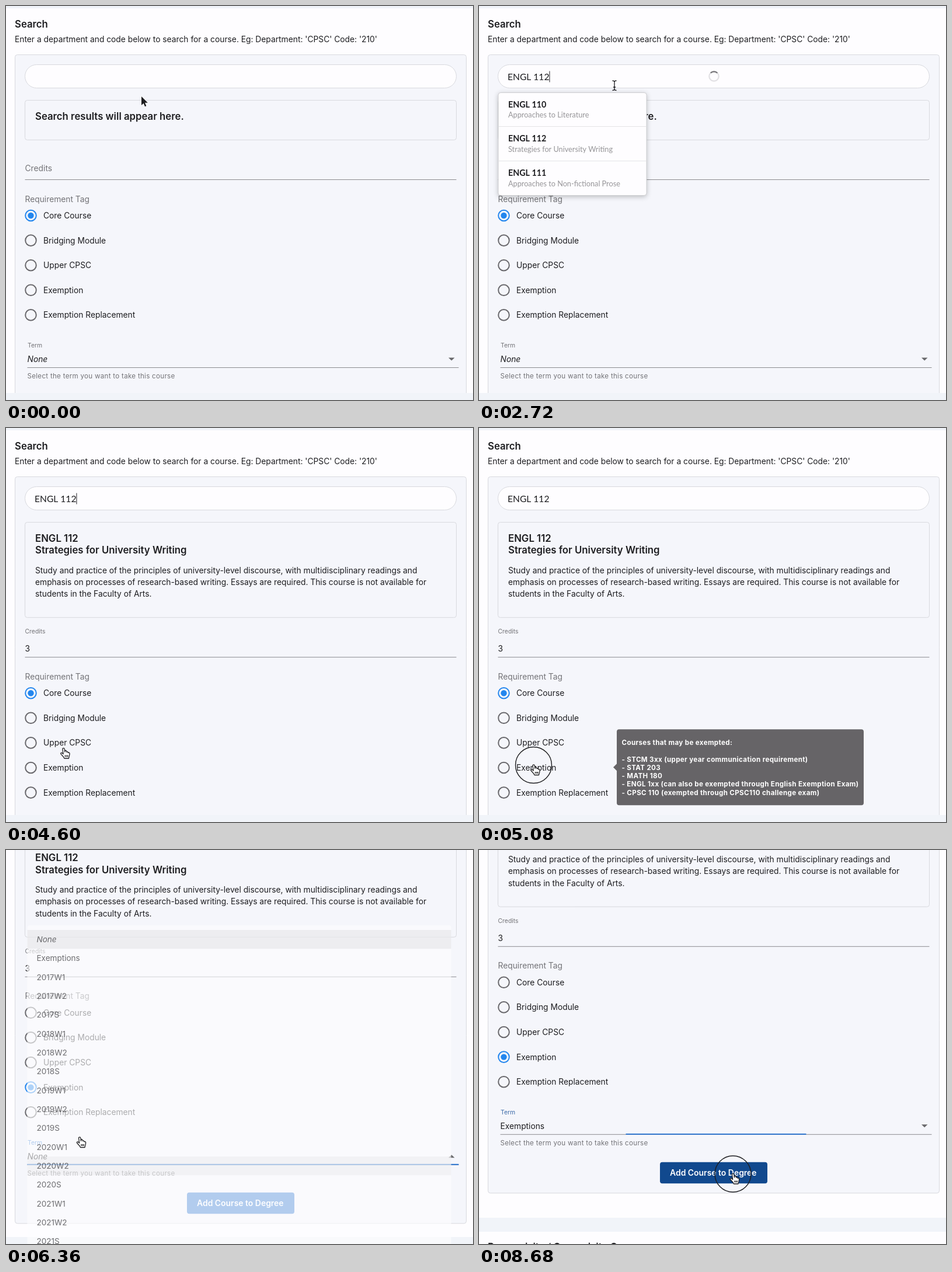
An HTML page with a canvas that plays this animation: 800x675 px, repeating every 8.72 s.

```html
<!DOCTYPE html>
<html lang="en">
<head>
<meta charset="utf-8">
<title>Course search</title>
<style>
  html, body { margin: 0; width: 100%; height: 100%; overflow: hidden; background: #f2f4f9; }
  canvas { display: block; }
</style>
</head>
<body>
<canvas id="stage" width="800" height="675"></canvas>
<script>
const ctx = document.getElementById('stage').getContext('2d');
const LOOP = 8720;
const INK = '#1d1d20', GREY = '#737377', LINE = '#d8d9de', PAPER = '#fefdff', PANEL = '#f5f6fb', BAND = '#f1f4f9', BLUE = '#2f77d2';

const T = { select: 3280, pick: 5180, open: 6208, close: 7521, blur: 8604 };
const KEYS = [[720, 'E'], [800, 'N'], [880, 'G'], [960, 'L'], [1040, ' '], [1320, '1'], [1520, '1'], [2360, '2']];
const LOADING = [[960, 1080], [1520, 2120], [2360, 3240]];
const CLICKS = [[400, 560], [3160, 3320], [5000, 5160], [6080, 6200], [7400, 7520], [8600, 8720]];
const PATH = [[0, 232, 155], [40, 232, 155], [360, 232, 136], [2740, 232, 136], [3120, 118, 238], [3340, 118, 238],
  [3840, 118, 452], [4040, 116, 458], [4240, 110.5, 479], [4800, 93.5, 577.5], [5240, 93.5, 577.5], [5400, 100, 560], [5800, 120, 524],
  [6200, 124, 526], [6360, 126, 492.5], [7000, 300, 176], [7500, 320, 174], [7760, 504, 484], [8160, 436, 600], [8560, 435, 555], [LOOP, 435, 555]];
const CURSORS = [[0, 'arrow'], [280, 'beam'], [2860, 'hand'], [3330, 'arrow'], [3700, 'hand']];

const RESULTS = [['ENGL 110', 'Approaches to Literature'], ['ENGL 112', 'Strategies for University Writing'],
  ['ENGL 111', 'Approaches to Non-fictional Prose']];
const ABOUT = ['Study and practice of the principles of university-level discourse, with multidisciplinary readings and',
  'emphasis on processes of research-based writing. Essays are required. This course is not available for',
  'students in the Faculty of Arts.'];
const TAGS = ['Core Course', 'Bridging Module', 'Upper CPSC', 'Exemption', 'Exemption Replacement'];
const CORE_TIP = ['Core BCS Courses that must be taken:',
  '- CPSC 110:   Computation, Programs, and Programming', '- CPSC 121:   Models of Computation',
  '- CPSC 210:   Software Construction', '- CPSC 221:   Basic Data Structures and Algorithms',
  '- CPSC 213:   Introduction to Computer Systems', '- CPSC 310:   Introduction to Software Engineering',
  '- CPSC 313:   Computer Hardware and Operating Systems', '- CPSC 320:   Intermediate Algorithm Design and Analysis'];
const EXEMPT_TIP = ['Courses that may be exempted:', '', '- STCM 3xx (upper year communication requirement)', '- STAT 203',
  '- MATH 180', '- ENGL 1xx (can also be exempted through English Exemption Exam)', '- CPSC 110 (exempted through CPSC110 challenge exam)'];
const TERMS = ['None', 'Exemptions'];
for (let year = 2017; year < 2022; year++) TERMS.push(year + 'W1', year + 'W2', year + 'S');

const lerp = (a, b, p) => a + (b - a) * p;
const within = (t, spans) => spans.some(([a, b]) => t >= a && t < b);

// cubic-bezier(.4, 0, .2, 1)
function ease(x) {
  if (x <= 0) return 0;
  if (x >= 1) return 1;
  let lo = 0, hi = 1;
  for (let i = 0; i < 20; i++) {
    const s = (lo + hi) / 2, r = 1 - s;
    if (1.2 * r * r * s + 0.6 * r * s * s + s * s * s < x) lo = s; else hi = s;
  }
  return lo * lo * (3 - 2 * lo);
}
const ramp = (t, start, length) => ease((t - start) / length);

// Popover transition: scale leads when opening and lags when closing
function grow(t, open, close, length) {
  const inT = (t - open) / length, outT = (t - close) / length;
  const size = outT > 0 ? 1 - ease((outT - 0.333) / 0.667) : ease(inT / 0.6);
  return { alpha: outT > 0 ? 1 - ease(outT) : ease(inT), scale: 0.75 + 0.25 * size };
}

// y is the middle of the capitals
function text(str, x, y, { size = 13.8, color = INK, weight = 400, family = 'Inter', style = 'normal', spacing = 0 } = {}) {
  ctx.font = `${style} ${weight} ${size}px ${family}, sans-serif`;
  ctx.letterSpacing = spacing + 'px';
  ctx.fillStyle = color;
  ctx.fillText(str, x, y + size * 0.363);
}
const heading = (str, x, y) => text(str, x, y, { size: 16.75, weight: 600 });

function rect(x, y, w, h, fill) {
  ctx.fillStyle = fill;
  ctx.fillRect(x, y, w, h);
}
function box(x, y, w, h, r, fill, stroke) {
  ctx.beginPath();
  ctx.roundRect(x, y, w, h, r);
  if (fill) { ctx.fillStyle = fill; ctx.fill(); }
  if (stroke) { ctx.strokeStyle = stroke; ctx.lineWidth = 1; ctx.stroke(); }
}
function arc(x, y, r, color, width, from = 0, to = 7) {
  ctx.beginPath();
  ctx.arc(x, y, r, from, to);
  ctx.strokeStyle = color;
  ctx.lineWidth = width;
  ctx.stroke();
}
function poly(points, fill) {
  ctx.beginPath();
  points.forEach(([x, y]) => ctx.lineTo(x, y));
  ctx.closePath();
  ctx.fillStyle = fill;
  ctx.fill();
}

function drawInput(t) {
  box(32.5, 100.5, 739, 40, 20, PAPER, LINE);
  const typed = KEYS.filter(([at]) => t >= at).map(key => key[1]).join('');
  text(typed, 49, 121, { size: 15.6, family: 'Lato' });
  if (t > 560 && t < 5000) rect(49 + ctx.measureText(typed).width, 111.5, 1, 19, INK);
  if (within(t, LOADING)) {
    const a = (t - 2720) / 600 * 2 * Math.PI - Math.PI * 0.75;
    arc(402.5, 120.5, 8.2, '#e2e1e4', 2.2);
    arc(402.5, 120.5, 8.2, '#767578', 2.2, a, a + Math.PI / 2);
  }
}

function drawRadio(label, y, checked) {
  arc(42.5, y, 9.3, checked ? '#2386ee' : '#69686c', 2);
  if (checked) {
    ctx.beginPath();
    ctx.arc(42.5, y, 5.2, 0, 7);
    ctx.fillStyle = '#2386ee';
    ctx.fill();
  }
  text(label, 64, y);
}

function drawTerm(t) {
  const open = t > T.open && t < T.close;
  const line = ramp(t, 6100, 200) * (1 - ramp(t, T.blur, 200));
  if (t > T.close && t < T.blur) rect(36.5, 591, 739, 28, 'rgba(0,0,0,.06)');
  const tint = t < T.blur ? BLUE : '#3c6ba8';
  text('Term', 37, 581.5, { size: 10.4, color: t > 6100 ? tint : GREY });
  if (t < T.close) text('None', 36.5, 605, { style: 'italic' });
  else text('Exemptions', 36.5, 605);
  rect(36.5, 619, 739, 1, '#8b8b8f');
  rect(406 - 369.5 * line, 618, 739 * line, 2, BLUE);
  const d = open ? -2.5 : 2.5;
  poly([[758, 605 - d], [768.5, 605 - d], [763.2, 605 + d]], '#68686b');
  text('Select the term you want to take this course', 36.5, 633.5, { size: 11.6, color: GREY, spacing: 0.28 });
}

function drawForm(t) {
  const chosen = t >= T.select, extra = chosen ? 95.2 : 0;
  heading('Search', 15, 30.5);
  text("Enter a department and code below to search for a course. Eg: Department: 'CPSC' Code: '210'", 15, 57);
  box(15.5, 83.5, 773, 636.5 + extra, 4, PANEL, LINE);
  drawInput(t);
  box(32.5, 161.5, 739, 68 + extra, 4, null, LINE);
  if (chosen) {
    heading('ENGL 112', 50, 188.5);
    heading('Strategies for University Writing', 50, 209);
    ABOUT.forEach((line, i) => text(line, 50, 243.5 + 20.3 * i));
  } else heading('Search results will appear here.', 50, 188.5);

  ctx.save();
  ctx.translate(0, extra);
  const shrink = ramp(t, T.select, 200);
  text('Credits', 32.5, lerp(278, 253.5, shrink), { size: lerp(13.8, 10.4, shrink), color: GREY });
  if (chosen) text('3', 32.5, 283);
  rect(32.5, 297, 739, 1, '#8b8b8f');
  text('Requirement Tag', 32.5, 330.5, { color: GREY });
  TAGS.forEach((tag, i) => drawRadio(tag, 359 + 42.6 * i, i === (t < T.pick ? 0 : 3)));
  drawTerm(t);
  box(310, 667, 184, 36.5, 4, t < 8180 ? BLUE : '#11498e');
  text('Add Course to Degree', 327, 685.3, { size: 13.95, color: '#fff', weight: 600 });
  ctx.restore();
}

function drawResults() {
  ctx.save();
  ctx.shadowColor = 'rgba(34,36,38,.3)';
  ctx.shadowBlur = 8;
  ctx.shadowOffsetY = 2;
  box(33, 148.5, 254, 176, 4, PAPER);
  ctx.restore();
  box(33, 148.5, 254, 176, 4, null, '#cfcfd2');
  RESULTS.forEach(([code, name], i) => {
    const y = 148.5 + 58.7 * i;
    if (i) rect(33, Math.round(y) - 1, 254, 1, '#e4e4e6');
    text(code, 50, y + 20, { size: 14.3, weight: 700, family: 'Lato' });
    text(name, 50, y + 38, { size: 12.7, color: '#969598', family: 'Lato' });
  });
}

function drawTip(lines, width, y, { alpha, scale }) {
  if (alpha <= 0) return;
  const height = lines.length * 14.2 + 30.5;
  ctx.save();
  ctx.globalAlpha = alpha;
  ctx.translate(236, y);
  ctx.scale(scale, scale * scale);
  box(0, -height / 2, width, height, 4, '#666467');
  poly([[0, -6], [-6, 0], [0, 6]], '#666467');
  lines.forEach((line, i) => text(line, 8.5, (i - (lines.length - 1) / 2) * 14.2 + 0.5,
    { size: 11.6, weight: 700, color: '#fff', spacing: 0.35 }));
  ctx.restore();
}

function drawMenu(t, cursorY) {
  const { alpha, scale } = grow(t, T.open, T.close, 373);
  if (alpha <= 0) return;
  const row = 33.5, top = -11.5 * row;
  const hovered = t < 6400 ? 12 : Math.round((cursorY - 525 - top) / row);
  ctx.save();
  ctx.globalAlpha = alpha;
  ctx.translate(36.5, 525);
  ctx.scale(scale, scale * scale);
  box(0, top - row / 2 - 8, 739, TERMS.length * row + 16, 4, PAPER);
  TERMS.forEach((term, i) => {
    const y = top + row * i;
    if (i === (t < T.close ? 0 : 1)) rect(0, y - row / 2, 739, row, 'rgba(0,0,0,.08)');
    else if (i === hovered && t < T.close) rect(0, y - row / 2, 739, row, 'rgba(0,0,0,.05)');
    text(term, 16.2, y, { style: i ? 'normal' : 'italic' });
  });
  ctx.restore();
}

function cursorAt(t) {
  const i = PATH.findIndex(([at]) => at > t);
  const [t0, x0, y0] = PATH[i - 1], [t1, x1, y1] = PATH[i];
  const p = (t - t0) / (t1 - t0), s = p * p * (3 - 2 * p);
  return [lerp(x0, x1, s), lerp(y0, y1, s)];
}

const SHAPES = {
  arrow: ['M0 0V15L3.6 11.7L6 17.2L8.4 16.2L6 10.8H10.8Z', INK, '#fff'],
  hand: ['M-1.5 1C-1.5-1.2 1.7-1.2 1.8 1L2.5 6C3-.2 6 5.2 5.5 6.2C6.5 5 8.3 6 8.2 7.4C9.5 6.4 10.8 7.5 10.6 9C10.6 12 9.5 14 9 17H1.5C.5 14-2 12.5-4.3 9.5C-5.5 7.6-3.2 6.6-1.8 8.2L-.3 9.6Z M3 11.5V14.5 M5.2 11.5V14.5 M7.3 11.5V14.5', '#fff', INK],
  beam: ['M-3.5-8Q0-8 0-6Q0-8 3.5-8M0-6V6.5M-3.5 8.5Q0 8.5 0 6.5Q0 8.5 3.5 8.5M-2 3H2', null, INK]
};
function drawCursor(t, x, y) {
  if (within(t, CLICKS)) arc(x, y, 31, INK, 1.4);
  const kind = CURSORS.filter(([at]) => t >= at).pop()[1];
  const [d, fill, stroke] = SHAPES[kind], path = new Path2D(d);
  ctx.save();
  ctx.translate(x, y);
  ctx.lineJoin = 'round';
  ctx.lineWidth = 1.3;
  ctx.strokeStyle = stroke;
  if (kind === 'arrow') ctx.stroke(path);
  if (fill) { ctx.fillStyle = fill; ctx.fill(path); }
  if (kind !== 'arrow') ctx.stroke(path);
  ctx.restore();
}

function draw(t) {
  const page = 33 * ramp(t, 8160, 300);
  const scroll = 175.4 * ramp(t, 5400, 400) + 19 * ramp(t, 8060, 200);
  const top = Math.max(0, 4 - scroll);
  const [x, y] = cursorAt(t);

  rect(0, 0, 800, 675, BAND);
  ctx.save();
  ctx.translate(0, -page);
  rect(0, 687, 800, 100, PAPER);
  heading('Prerequisite / Corequisite Courses', 15, 713);
  ctx.beginPath();
  ctx.rect(0, top, 800, 663 - top);
  ctx.clip();
  rect(0, top, 800, 663 - top, PAPER);
  ctx.translate(0, -scroll);
  drawForm(t);
  ctx.restore();

  if (t > 1700 && t < T.select) drawResults();
  drawTip(CORE_TIP, 357, 454, grow(t, 3760, 4070, 266));
  drawTip(EXEMPT_TIP, 423, 581.2 - scroll, grow(t, 4760, 5280, 250));
  drawMenu(t, y);
  drawCursor(t, x, y);
}

function frame() {
  draw(performance.now() % LOOP);
  requestAnimationFrame(frame);
}
frame();
</script>
</body>
</html>
```
